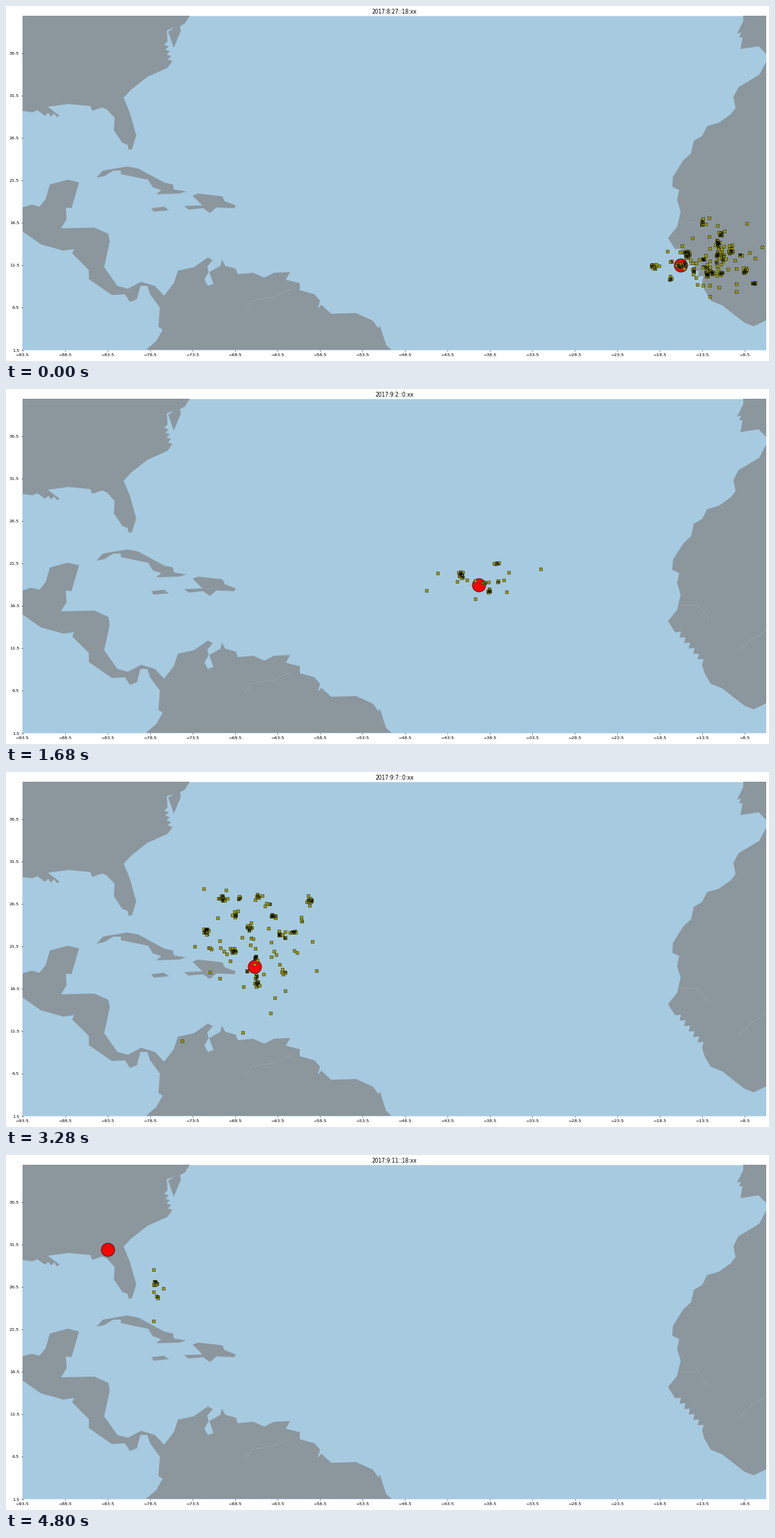
Write a matplotlib script that moves like this. It is 1096x511 px and loops after 4.88 s.

```python
import numpy as np
import matplotlib.pyplot as plt
from matplotlib.animation import FuncAnimation

WIDTH, HEIGHT, DPI = 1096, 511, 46
LEFT, RIGHT, TOP, BOTTOM = 23.5, 1092, 14.5, 495.5
SCALE = 12.211          # pixels per degree
WEST, SOUTH = -93.5, 1.5
FRAMES, INTERVAL = 61, 80


def zigzag(start, end, teeth, depth):
    """Ragged shore: a line with regular notches to one side."""
    start, end = np.array(start), np.array(end)
    dx, dy = end - start
    normal = np.array([-dy, dx]) / np.hypot(dx, dy)
    return [start + (end - start) * k / (2 * teeth) + normal * depth * (k % 2)
            for k in range(2 * teeth + 1)]


NORTH_AMERICA = [
    (23, 14), (264, 14), (257, 25), (250, 29), (251, 36), (241, 60), (233, 37),
    (242, 31), (231, 35), *zigzag((232, 51), (239, 79), 4, 6), (232, 89),
    (203, 102), (179, 121), (169, 132), (178, 154), (187, 186), (181, 206),
    (176, 207), (175, 200), (167, 197), (155, 179), (156, 161), (145, 149),
    (138, 146), (124, 151), (121, 144), (90, 141), (60, 145), (77, 158),
    *zigzag((73, 160), (56, 158), 2, 5), (45, 150), (38, 153), (23, 151)]
SOUTH_AMERICA = [
    (23, 290), (37, 286), (48, 289), (57, 278), (63, 257), (89, 250), (105, 254),
    (94, 291), (86, 290), (87, 307), (79, 320), (127, 319), (147, 328),
    (149, 339), (141, 376), (160, 403), (175, 407), (194, 397), (214, 403),
    (227, 417), (241, 399), (247, 381), (270, 376), (290, 362), (297, 366),
    (289, 375), (291, 383), (285, 394), (290, 403), (298, 400), (292, 383),
    (308, 374), (310, 365), (315, 374), (330, 378), (333, 386), (355, 384),
    (371, 391), (385, 384), (408, 383), (402, 394), (422, 399), (422, 409),
    (443, 415), (451, 424), (448, 436), (453, 430), (467, 443), (503, 442),
    (527, 453), (535, 464), (537, 460), (546, 488), (555, 496), (200, 496),
    (216, 482), (225, 466), (219, 462), (221, 434), (207, 415), (203, 403),
    (193, 403), (188, 422), (178, 426), (171, 415), (152, 416), (119, 393),
    (119, 380), (95, 356), (98, 350), (82, 352), (50, 343), (23, 324)]
CUBA = [
    (130, 247), (139, 237), (174, 231), (190, 234), (227, 254), (240, 257),
    (241, 264), (259, 267), (249, 270), (216, 271), (223, 265), (211, 261),
    (204, 250), (165, 242), (165, 237), (154, 237), (141, 245)]
HISPANIOLA = [
    (268, 273), (276, 270), (311, 274), (314, 281), (330, 287), (328, 291),
    (302, 290), (293, 298), (283, 291), (262, 293), (256, 288), (282, 287)]
JAMAICA = [(209, 291), (227, 289), (234, 294), (212, 296)]
IBERIA = [
    (1059, 14), (1059, 22), (1050, 40), (1056, 38), (1053, 45), (1058, 45),
    (1055, 62), (1081, 58), (1093, 70), (1093, 14)]
AFRICA = [
    (1093, 78), (1082, 99), (1052, 117), (1045, 131), (1048, 147), (1041, 156),
    (1024, 168), (1007, 173), (1000, 187), (988, 194), (984, 212), (973, 222),
    (958, 246), (957, 260), (967, 265), (964, 279), (969, 296), (964, 318),
    (951, 334), *zigzag((961, 350), (1000, 397), 6, -7), (1003, 408),
    (1012, 424), (1029, 431), (1061, 456), (1074, 461), (1093, 452)]
RIVERS = [
    [(343, 438), (353, 424), (384, 419), (409, 408)],
    [(966, 312), (993, 311), (1010, 331)],
    [(1052, 379), (1070, 361), (1093, 347)]]

# Storm centre: step, longitude, latitude.
TRACK = np.array([
    (0, -16.1, 11.5), (9, -26.9, 16.1), (12, -30.8, 16.3), (15, -33.4, 16.7),
    (19, -37.3, 18.4), (22, -41.1, 19.1), (27, -47.9, 17.9), (31, -52.6, 16.8),
    (35, -57.8, 16.7), (39, -63.3, 18.1), (42, -67.6, 19.7), (46, -73.2, 21.5),
    (49, -77.2, 22.1), (53, -80.9, 23.4), (55, -81.5, 24.5), (57, -81.7, 26.8),
    (60, -83.5, 30.9)])

# Lightning: step, number of clusters, offset from the storm and spread in degrees.
ACTIVITY = np.array([
    (0, 25, 4.5, 1, 3, 2), (15, 3, 2.4, 3.2, .5, .6), (27, 7, 0, -1, 5, 2.5),
    (35, 15, -1, 5, 4, 4), (46, 30, 0, 0, 5, 4.5), (53, 32, -1, -1.5, 5, 4.5),
    (60, 2, 6, -4, .6, 4)])


def geo(points):
    """Stage pixels to longitude and latitude."""
    x, y = np.array(points).T
    return WEST + (x - LEFT) / SCALE, SOUTH + (BOTTOM - y) / SCALE


def storm_center(step):
    """Smooth (cubic Hermite) path through the track points."""
    times, places = TRACK[:, 0], TRACK[:, 1:]
    slopes = np.gradient(places, times, axis=0)
    i = min(np.searchsorted(times, step, side="right") - 1, len(times) - 2)
    span = times[i + 1] - times[i]
    u = (step - times[i]) / span
    ease = u * u * (3 - 2 * u)
    return (places[i] * (1 - ease) + places[i + 1] * ease
            + span * u * (1 - u) * (slopes[i] * (1 - u) - slopes[i + 1] * u))


def strikes(step):
    """Tight random clusters and stray strikes within ten degrees of the storm."""
    rng = np.random.default_rng(step + 7)
    count, *place = [np.interp(step, ACTIVITY[:, 0], column)
                     for column in ACTIVITY.T[1:]]
    offset, spread = place[:2], place[2:]
    count = int(count)
    centers = rng.normal(offset, spread, (count, 2))
    widths = rng.uniform(.04, .25, (count, 2))
    groups = [rng.normal(center, width, (rng.integers(3, 20), 2))
              for center, width in zip(centers, widths)]
    strays = rng.normal(offset, spread, (2 * count, 2))
    points = np.vstack(groups + [strays])
    return storm_center(step) + points[np.abs(points).max(axis=1) < 10]


def stamp(step):
    days, hour = divmod(18 + 6 * step, 24)
    month, day = (8, 27 + days) if days < 5 else (9, days - 4)
    return f"2017:{month}:{day}::{hour}:xx"


fig = plt.figure(figsize=((WIDTH + 1e-6) / DPI, (HEIGHT + 1e-6) / DPI), dpi=DPI,
                 facecolor="white")
ax = fig.add_axes([LEFT / WIDTH, 1 - BOTTOM / HEIGHT,
                   (RIGHT - LEFT) / WIDTH, (BOTTOM - TOP) / HEIGHT])
ax.set_facecolor("#A6CAE0")
ax.patch.set_snap(False)
ax.spines[:].set_visible(False)

for shore in (NORTH_AMERICA, SOUTH_AMERICA, CUBA, HISPANIOLA, JAMAICA, IBERIA, AFRICA):
    ax.fill(*geo(shore), color="#8B969D", lw=0)
for river in RIVERS:
    ax.plot(*geo(river), color="#A3AFB6", lw=.7)

storm, = ax.plot([], [], "o", ms=30, mfc="red", mec="black", mew=1)
boxes, = ax.plot([], [], "s", ms=6.4, mfc="yellow", mec="black", mew=.9)
crosses, = ax.plot([], [], "x", ms=4, color="black", mew=.7)
title = ax.set_title("")

east, north = geo((RIGHT, TOP))
ax.set(xlim=(WEST, east), ylim=(SOUTH, north),
       xticks=np.arange(WEST, east, 5), yticks=np.arange(SOUTH, north, 5))


def update(step):
    storm.set_data(*storm_center(step)[:, None])
    points = strikes(step).T
    boxes.set_data(*points)
    crosses.set_data(*points)
    title.set_text(stamp(step))
    return storm, boxes, crosses, title


anim = FuncAnimation(fig, update, frames=FRAMES, interval=INTERVAL,
                     repeat=True, repeat_delay=0, blit=False)
plt.show()
```
